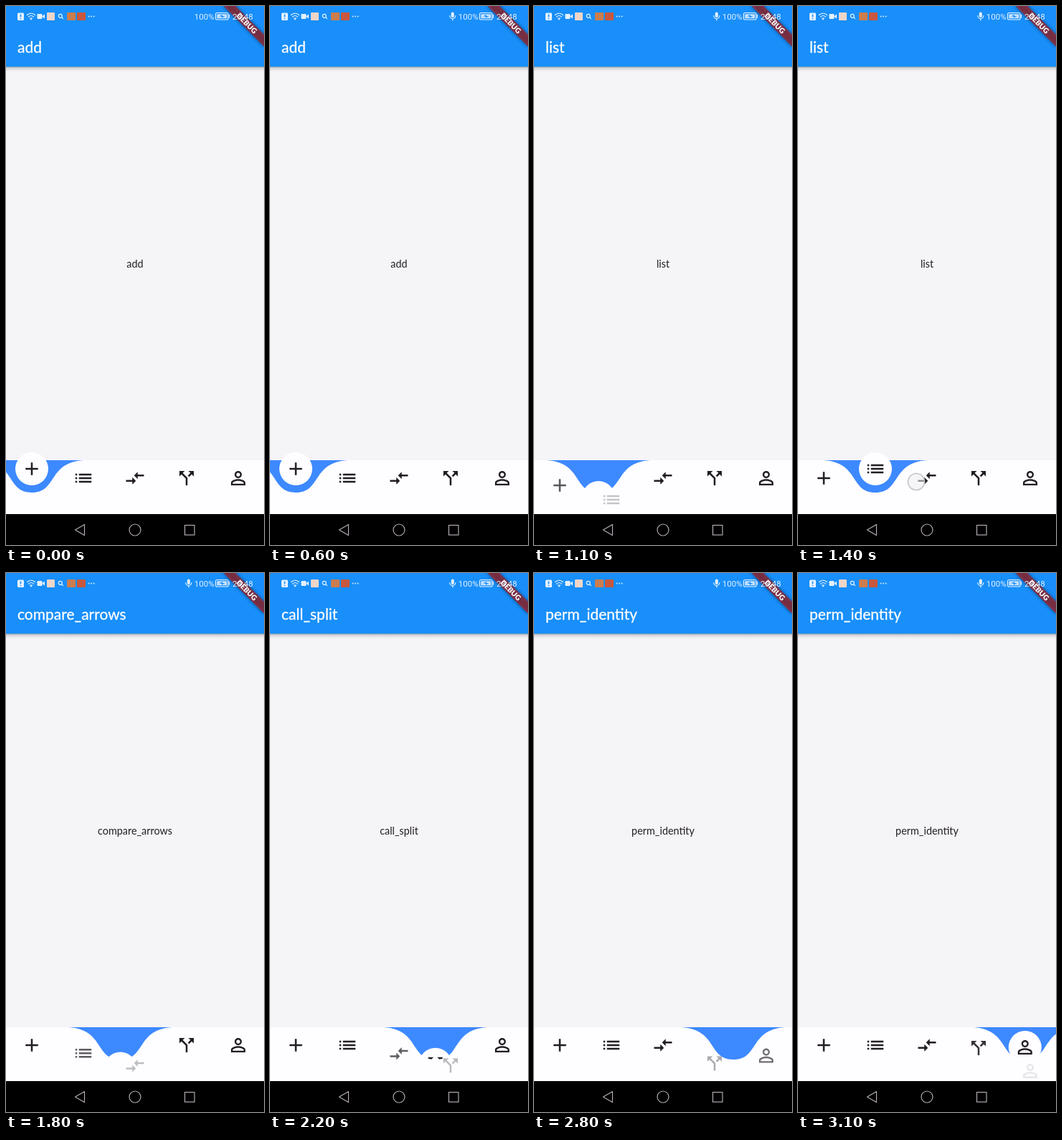
These frames come from a looping animation (360 px wide and 750 px high, 3200 ms). An HTML page:

```html
<!DOCTYPE html>
<html lang="en">
<head>
<meta charset="utf-8">
<title>Curved navigation bar</title>
<style>
  html, body { margin: 0; width: 100%; height: 100%; overflow: hidden; background: #f5f4f7; }
  svg { display: block; width: 100%; height: 100%; }
  text { font-family: Lato, "Open Sans", sans-serif; }
  .status text { font: 11.5px Roboto, Inter, sans-serif; fill: #e4f1ff; }
  .line { fill: none; stroke: #e4f1ff; stroke-width: 1.2; stroke-linecap: round; }
  .keys { fill: none; stroke: #b3a9b3; stroke-width: 1.2; }
  .icon { fill: #211d22; }
</style>
</head>
<body>
<svg viewBox="0 0 360 750">
  <defs>
    <linearGradient id="shade" x2="0" y2="1">
      <stop offset="0" stop-opacity=".34"/>
      <stop offset=".4" stop-opacity=".12"/>
      <stop offset="1" stop-opacity="0"/>
    </linearGradient>
    <filter id="blur" x="-20%" y="-80%" width="140%" height="260%"><feGaussianBlur stdDeviation="2.5"/></filter>
  </defs>

  <rect width="360" height="750" fill="#f5f4f7"/>
  <rect y="84" width="360" height="7" fill="url(#shade)"/>
  <rect width="360" height="84.5" fill="#188ffa"/>
  <text id="title" x="16" y="65" font-size="21" fill="#fff" stroke="#fff" stroke-width=".3"></text>
  <text id="label" x="180" y="364" font-size="14.4" text-anchor="middle" fill="#241f26"></text>

  <!-- curved bar -->
  <rect y="632" width="360" height="75" fill="#3d89ff"/>
  <g id="button">
    <circle r="23" fill="#fefdff"/>
    <path id="buttonIcon" class="icon" transform="scale(1.25) translate(-12 -12)"/>
  </g>
  <path id="bar" fill="#fefdff"/>
  <g id="items"></g>

  <!-- system keys -->
  <rect y="707" width="360" height="43" fill="#000"/>
  <g class="keys">
    <path d="M109.5 721.5V736.5L96.500 729Z" stroke-linejoin="round"/>
    <circle cx="180" cy="729" r="8"/>
    <rect x="249.500" y="722.500" width="13.500" height="13.500"/>
  </g>

  <!-- corner ribbon -->
  <g transform="translate(360 0) rotate(45)">
    <rect x="-40" y="28" width="80" height="12" opacity=".5" filter="url(#blur)"/>
    <rect x="-40" y="28" width="80" height="12" fill="#b71c1c" fill-opacity=".63"/>
    <text y="37.600" font-size="10.200" font-weight="900" text-anchor="middle" fill="#fff">DEBUG</text>
  </g>

  <!-- status bar -->
  <g class="status" fill="#e4f1ff">
    <rect x="16" y="9.500" width="9" height="10.500" rx="1.500"/>
    <path d="M20.500 11.500V15.500M20.500 17V18.300" stroke="#188ffa" stroke-width="1.500"/>
    <path class="line" d="M29.500 12.500Q35 8 40.500 12.500M31.500 15Q35 12 38.500 15M33.500 17.300Q35 16.200 36.500 17.300"/>
    <circle cx="35" cy="18.500" r="1"/>
    <rect x="43.500" y="11" width="7" height="7" rx="1.200"/>
    <path d="M50 14.500L54 11.500V17.500Z"/>
    <rect x="57" y="9" width="11" height="11" rx="1" fill="#f0d6c8"/>
    <circle class="line" cx="75.800" cy="13.800" r="2.500"/>
    <path class="line" d="M77.700 15.700L79.500 17.500"/>
    <rect x="85" y="9" width="12" height="11" rx="1" fill="#cb7d4e"/>
    <rect x="99" y="9" width="12" height="11" rx="1" fill="#c9573f"/>
    <circle cx="115.700" cy="14.500" r=".9"/><circle cx="119.200" cy="14.500" r=".9"/><circle cx="122.700" cy="14.500" r=".9"/>
    <g id="mic">
      <rect x="252.800" y="8.500" width="4" height="7.500" rx="2"/>
      <path class="line" d="M250.800 13.500a4 4 0 0 0 8 0M254.800 17.800V20"/>
    </g>
    <text x="262.800" y="18.700">100%</text>
    <rect class="line" x="292.500" y="9.500" width="17.500" height="9.500" rx="2"/>
    <rect x="294.300" y="11.300" width="14" height="6" rx="1" opacity=".85"/>
    <path d="M311.500 12V16.500" stroke="#e4f1ff" stroke-width="1.200"/>
    <path d="M297.500 14.500L302 12V14H305.500L301 16.700V14.700Z" fill="#188ffa"/>
    <text x="316" y="18.700">23:48</text>
  </g>

  <circle id="touch" r="11.500" fill="#ececf0" fill-opacity=".55" stroke="#c6c3ca" stroke-width="1.600"/>
</svg>
<script>
const LOOP = 3200, STEP = 100, GLIDE = 600;
const CELL = 72, WIDTH = 360, TOP = 632, BAR = 75;

const pages = [
  ["add", "M19 13h-6v6h-2v-6H5v-2h6V5h2v6h6z"],
  ["list", "M3 13h2v-2H3zm0 4h2v-2H3zm0-8h2V7H3zm4 4h14v-2H7zm0 4h14v-2H7zM7 7v2h14V7z"],
  ["compare_arrows", "M9.01 14H2v2h7.01v3L13 15l-3.99-4zm5.98-1v-3H22V8h-7.01V5L11 9z"],
  ["call_split", "M14 4l2.29 2.29-2.88 2.88 1.42 1.42 2.88-2.88L20 10V4zm-4 0H4v6l2.29-2.29 4.71 4.7V20h2v-8.41l-5.29-5.3z"],
  ["perm_identity", "M12 5.9a2.1 2.1 0 1 1 0 4.2a2.1 2.1 0 1 1 0-4.2m0 9c2.97 0 6.1 1.46 6.1 2.1v1.1H5.9V17c0-.64 3.13-2.1 6.1-2.1M12 4C9.79 4 8 5.79 8 8s1.79 4 4 4 4-1.79 4-4-1.79-4-4-4zm0 9c-2.67 0-8 1.34-8 4v3h16v-3c0-2.66-5.33-4-8-4z"]
];

// time of each tap; tap n selects page n + 1
const taps = [762, 1482, 1861, 2656];

// start, end, x, y, opacity
const touches = [
  [700, 800, 112, 667, 1],
  [800, 1000, 112, 667, .2],
  [1400, 1500, 165, 662, 1],
  [2600, 2700, 311, 661, 1]
];

const $ = id => document.getElementById(id);
const place = (el, x, y) => el.setAttribute("transform", `translate(${x} ${y})`);

const icons = pages.map(([, d]) => {
  const g = document.createElementNS("http://www.w3.org/2000/svg", "g");
  g.innerHTML = `<path class="icon" transform="scale(1.25) translate(-12 -12)" d="${d}"/>`;
  return $("items").appendChild(g);
});

// cubic-bezier(0, 0, .58, 1)
function easeOut(x) {
  if (x >= 1) return 1;
  let lo = 0, hi = 1;
  for (let i = 0; i < 24; i++) {
    const u = (lo + hi) / 2;
    if (1.74 * u * u * (1 - u) + u ** 3 < x) lo = u; else hi = u;
  }
  return lo * lo * (3 - 2 * lo);
}

// a new tap starts from wherever the last glide has got to
function glide(t) {
  let from = 0, to = 0, begin = -GLIDE;
  const at = now => from + (to - from) * easeOut((now - begin) / GLIDE);
  taps.forEach((tap, i) => {
    if (t < tap) return;
    from = at(tap);
    to = i + 1;
    begin = tap;
  });
  return { from, to, pos: at(t) };
}

function barPath(pos) {
  const x = k => (pos / 5 + k) * WIDTH;
  const y = k => TOP + k * BAR;
  return `M0 ${TOP}H${x(-.1)}` +
    `C${x(.04)} ${y(.05)} ${x(0)} ${y(.6)} ${x(.1)} ${y(.6)}` +
    `C${x(.2)} ${y(.6)} ${x(.16)} ${y(.05)} ${x(.3)} ${TOP}` +
    `H${WIDTH}V${TOP + BAR}H0Z`;
}

function draw(t) {
  const { from, to, pos } = glide(t);
  const half = (to - from) / 2;
  const lift = half ? Math.abs((pos - from - half) / half) : 1;
  const shown = to - pos <= pos - from ? to : Math.round(from);

  $("title").textContent = $("label").textContent = pages[to][0];
  $("bar").setAttribute("d", barPath(pos));
  place($("button"), CELL * (pos + .5), 724 - 80 * lift);
  $("buttonIcon").setAttribute("d", pages[shown][1]);

  icons.forEach((icon, i) => {
    const away = Math.min(1, Math.abs(pos - i));
    place(icon, CELL * (i + .5), 657 + 40 * (1 - away));
    icon.setAttribute("opacity", away);
  });

  $("mic").setAttribute("opacity", t < 500 ? 0 : 1);
  const hit = touches.find(([a, b]) => t >= a && t < b);
  $("touch").setAttribute("opacity", hit ? hit[4] : 0);
  if (hit) place($("touch"), hit[2], hit[3]);
}

const start = performance.now();
function tick() {
  const t = (performance.now() - start) % LOOP;
  draw(Math.floor(t / STEP) * STEP);
  requestAnimationFrame(tick);
}
tick();
</script>
</body>
</html>
```
